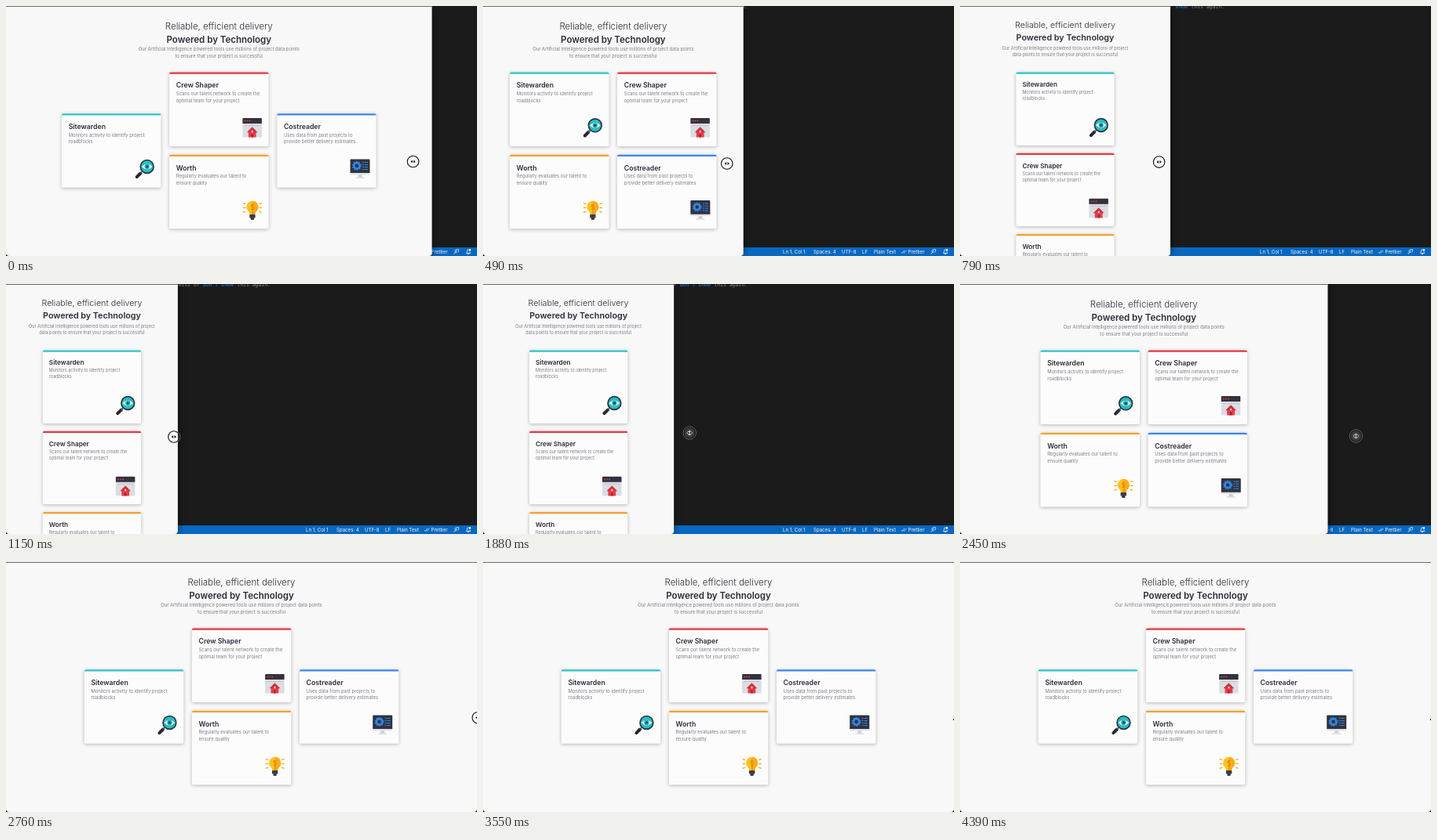
An HTML page with a canvas for the animation above (4420 ms loop, 600 by 319 pixels).

```html
<!DOCTYPE html>
<html lang="en">
<head>
<meta charset="utf-8">
<title>Responsive cards</title>
<style>
html, body { margin: 0; width: 100%; height: 100%; overflow: hidden; background: #1b1b1b; }
canvas { display: block; }
</style>
</head>
<body>
<canvas id="stage" width="600" height="319"></canvas>
<script>
const c = document.getElementById('stage').getContext('2d');
const LOOP = 4420;
const SANS = 'Inter, "Open Sans", sans-serif';
const DARK = '#2c2c3b', GREY = '#7c7e87';

// time, window width, pointer x, pointer y
const KEYS = [
  [0, 543, 519, 198.5], [490, 332, 311, 201], [1150, 219, 214, 195],
  [1420, 206, 207, 193], [1880, 243, 263, 190], [2210, 337, 366, 192],
  [2450, 468, 504, 194], [2750, 600, 599.5, 198.5], [3000, 600, 601.5, 201],
  [LOOP, 600, 601.5, 201]
];

const CARDS = {
  watch: { title: 'Sitewarden', color: '#2fc4c6', icon: magnifier,
    text: ['Monitors activity to identify project', 'roadblocks'] },
  team: { title: 'Crew Shaper', color: '#e5383f', icon: house,
    text: ['Scans our talent network to create the', 'optimal team for your project'] },
  merit: { title: 'Worth', color: '#f5a02f', icon: bulb,
    text: ['Regularly evaluates our talent to', 'ensure quality'] },
  cost: { title: 'Costreader', color: '#3d87ea', icon: monitor,
    text: ['Uses data from past projects to', 'provide better delivery estimates'] }
};

// Card places: offset from the page centre, top
const WIDE = {
  big: 11.5, title: 8.7, small: 5.92, line: 8.3, w: 126.5, h: 94.5, pad: 8.7,
  head: [30, 47, 57.2, 65.6], titleY: 19.8, textY: 29.6, icon: [93.3, 58.3],
  intro: ['Our Artificial Intelligence powered tools use millions of project data points',
    'to ensure that your project is successful']
};
const THREE = { ...WIDE, at: { watch: [-200.3, 137.2], team: [-63.2, 84.6], merit: [-63.2, 189.8], cost: [73.9, 137.2] } };
const TWO = { ...WIDE, at: { watch: [-131.8, 84.6], team: [5.2, 84.6], merit: [-131.8, 189.8], cost: [5.2, 189.8] } };
const ONE = {
  big: 10.75, title: 8.2, small: 5.5, line: 8, w: 125.3, h: 93.3, pad: 8,
  head: [28, 44, 56.2, 64.2], titleY: 18.8, textY: 27.8, icon: [93, 58],
  intro: ['Our Artificial Intelligence powered tools use millions of project',
    'data points to ensure that your project is successful'],
  at: { watch: [-62.6, 84.6], team: [-62.6, 187.8], merit: [-62.6, 291], cost: [-62.6, 394.2] }
};

function sample(t, col) {
  const slope = i => {
    const a = KEYS[Math.max(i - 1, 0)], b = KEYS[i], d = KEYS[Math.min(i + 1, KEYS.length - 1)];
    const turning = a !== b && b !== d && (b[col] - a[col]) * (d[col] - b[col]) <= 0;
    return turning ? 0 : (d[col] - a[col]) / (d[0] - a[0]);
  };
  let i = 0;
  while (i < KEYS.length - 2 && t >= KEYS[i + 1][0]) i++;
  const p = KEYS[i], q = KEYS[i + 1], span = q[0] - p[0], u = (t - p[0]) / span, v = 1 - u;
  return p[col] * v * v * (1 + 2 * u) + q[col] * u * u * (3 - 2 * u)
    + span * u * v * (slope(i) * v - slope(i + 1) * u);
}

function rect(color, x, y, w, h, radius = 0) {
  c.fillStyle = color;
  c.beginPath();
  c.roundRect(x, y, w, h, radius);
  c.fill();
}

function disc(color, x, y, r, from = 0, to = Math.PI * 2) {
  c.fillStyle = color;
  c.beginPath();
  c.arc(x, y, r, from, to);
  c.fill();
}

function poly(color, ...pts) {
  c.fillStyle = color;
  c.beginPath();
  for (let i = 0; i < pts.length; i += 2) c.lineTo(pts[i], pts[i + 1]);
  c.closePath();
  c.fill();
}

function line(color, width, ...pts) {
  c.strokeStyle = color;
  c.lineWidth = width;
  c.beginPath();
  for (let i = 0; i < pts.length; i += 2) c.lineTo(pts[i], pts[i + 1]);
  c.stroke();
}

function ring(color, width, x, y, r) {
  c.strokeStyle = color;
  c.lineWidth = width;
  c.beginPath();
  c.arc(x, y, r, 0, Math.PI * 2);
  c.stroke();
}

function text(str, x, y, font, color, align = 'left') {
  c.font = font;
  c.fillStyle = color;
  c.textAlign = align;
  c.fillText(str, x, y);
}

function shadow(color, blur, y = 0) {
  c.shadowColor = color;
  c.shadowBlur = blur;
  c.shadowOffsetY = y;
}

// Icons fill a box of about 25 by 25
function magnifier() {
  c.lineCap = 'round';
  line('#26262f', 4, 2.4, 22.6, 7, 18);
  c.lineCap = 'butt';
  line('#55606b', 1.6, 7, 18, 10, 15);
  disc('#2b2d38', 15.4, 9.4, 9.2);
  disc('#27bcc2', 15.4, 9.4, 7.6);
  c.fillStyle = '#e9f8f8';
  c.beginPath();
  c.moveTo(8.6, 9.4);
  c.quadraticCurveTo(15.4, 2.4, 22.2, 9.4);
  c.quadraticCurveTo(15.4, 16.4, 8.6, 9.4);
  c.fill();
  disc('#1fa5b0', 15.4, 9.4, 3.1);
  disc('#22424e', 15.4, 9.4, 1.4);
}

function house() {
  rect('#dcdde2', 0, 6, 24.5, 18.5, 1);
  rect('#31323e', 0, 0, 24.5, 7, [1, 1, 0, 0]);
  for (const x of [3.2, 6.2, 9.2]) disc('#d8404a', x, 3.6, 0.9);
  line('#b9bbc3', 0.7, 2, 9.6, 22.5, 9.6);
  rect('#e2404b', 7.4, 17, 9.8, 7.6);
  poly('#d22f3d', 12.3, 11.4, 19.2, 18.4, 5.4, 18.4);
  rect('#f4c9cc', 11.2, 16, 2.2, 2.4);
  rect('#a82736', 11, 20.4, 2.6, 4.2);
}

function bulb() {
  for (const y of [4.5, 9.3, 14.1]) {
    const tilt = (y - 9.3) / 4;
    line('#f7a81c', 1.3, 0.5, y + tilt, 4, y);
    line('#f7a81c', 1.3, 24.5, y + tilt, 21, y);
  }
  poly('#ffc21c', 7.5, 12, 12.5, 12, 12.5, 18, 9, 18);
  poly('#f3a011', 12.5, 12, 17.5, 12, 16, 18, 12.5, 18);
  disc('#ffc21c', 12.5, 8.3, 7.6);
  disc('#f9ac14', 12.5, 8.3, 7.6, -Math.PI / 2, Math.PI / 2);
  line('#e58110', 1, 14.6, 6, 11.2, 5.6, 10.8, 8, 14.2, 9, 13.8, 11.6, 10.4, 11.2);
  line('#e58110', 0.9, 12.5, 4, 12.5, 18);
  rect('#3a3c47', 8.8, 17.8, 7.4, 4.6, 0.8);
  rect('#25262e', 10.4, 22.2, 4.2, 2.4, 0.8);
}

function monitor() {
  rect('#e2e3e8', 0, 16, 25, 4, [0, 0, 1, 1]);
  rect('#31323e', 0, 0, 25, 17.6, [1, 1, 0, 0]);
  rect('#c9ccd4', 10, 20, 5, 3);
  rect('#dcdee4', 7, 22.8, 11, 1.8, 0.5);
  ring('#2f86e6', 2.8, 8.4, 8.4, 3.7);
  c.setLineDash([1.6, 1.87]);
  ring('#2f86e6', 1.2, 8.4, 8.4, 5.5);
  c.setLineDash([]);
  for (const y of [4, 7, 10, 13]) {
    line('#2f86e6', 1.1, 15.5, y, 17.5, y);
    line('#2f86e6', 1.1, 18.3, y, 22.5, y);
  }
}

function editor() {
  rect('#1b1b1b', 0, 0, 600, 319);
  const mono = 'italic 6.45px "DejaVu Sans Mono", monospace';
  text('dismiss or', 208, 3.4, mono, '#8a8a8a');
  text("don't show", 251, 3.4, mono, '#2f86d8');
  text('this again.', 294.6, 3.4, mono, '#8a8a8a');

  rect('#0868c0', 0, 308, 600, 11);
  const items = [['Ln 1, Col 1', 382], ['Spaces: 4', 421], ['UTF-8', 457],
    ['LF', 483], ['Plain Text', 498], ['Prettier', 541.5]];
  for (const [str, x] of items) text(str, x, 315.8, '6.1px ' + SANS, '#f4f8fc');
  line('#f4f8fc', 0.7, 533, 314, 534.3, 315.4, 537, 311.8);
  line('#f4f8fc', 0.7, 535.8, 314.8, 536.4, 315.4, 539.2, 311.8);
  ring('#f4f8fc', 0.7, 573, 312.6, 1.2);
  line('#f4f8fc', 0.7, 571, 316.6, 571.4, 315, 573, 314.4, 574.2, 315);
  line('#f4f8fc', 0.7, 573.6, 310.6, 576.6, 310.6, 576.6, 313.4, 575.2, 314.2);
  line('#f4f8fc', 0.8, 586.4, 315.4, 587.4, 313.6, 587.6, 311.4, 589, 310.6);
  line('#f4f8fc', 0.8, 586.4, 315.4, 591.8, 315.4, 590.9, 313.6);
  disc('#f4f8fc', 590.8, 311.4, 1.4);
  disc('#f4f8fc', 589, 316.4, 0.8);
}

function card({ title, color, icon, text: lines }, x, y, lay) {
  shadow('rgba(40,40,60,.32)', 4, 1);
  rect('#fcfcfc', x, y, lay.w, lay.h, 2);
  shadow('transparent', 0);
  rect(color, x, y, lay.w, 2.2, [2, 2, 0, 0]);
  text(title, x + lay.pad, y + lay.titleY, `600 ${lay.title}px ${SANS}`, DARK);
  lines.forEach((s, i) =>
    text(s, x + lay.pad, y + lay.textY + i * lay.line, `${lay.small}px ${SANS}`, GREY));
  c.save();
  c.translate(x + lay.icon[0], y + lay.icon[1]);
  icon();
  c.restore();
}

function page(w) {
  const lay = w < 300 ? ONE : w < 469 ? TWO : THREE;
  const mid = w / 2;
  rect('#000', 0, 308, 10, 11);
  if (w > 598) rect('#000', 590, 308, 10, 11);
  shadow('rgba(0,0,0,.6)', 10);
  rect('#f8f8f8', 0, 0, w, 319, [0, 0, 4, 4]);
  shadow('transparent', 0);
  rect('#6a6a6a', 0, 0, w, 0.9);

  const [a, b, d, e] = lay.head;
  text('Reliable, efficient delivery', mid, a, `300 ${lay.big}px ${SANS}`, DARK, 'center');
  text('Powered by Technology', mid, b, `600 ${lay.big}px ${SANS}`, DARK, 'center');
  text(lay.intro[0], mid, d, `${lay.small}px ${SANS}`, GREY, 'center');
  text(lay.intro[1], mid, e, `${lay.small}px ${SANS}`, GREY, 'center');
  for (const id in CARDS) card(CARDS[id], mid + lay.at[id][0], lay.at[id][1], lay);
}

function pointer(x, y, alpha) {
  c.save();
  c.translate(x, y);
  c.globalAlpha = alpha;
  disc('rgba(255,255,255,.14)', 0, 0, 8);
  ring('rgba(255,255,255,.4)', 1, 0, 0, 8.1);
  ring('#111', 1.1, 0, 0, 7.3);
  c.globalAlpha = 1;
  for (const s of [-1, 1]) {
    const arrow = [s * 3.2, 0, s * 0.7, -2, s * 0.7, 2, s * 3.2, 0];
    line('#fff', 1.3, ...arrow);
    poly('#111', ...arrow);
  }
  c.restore();
}

function draw() {
  const t = performance.now() % LOOP;
  editor();
  page(sample(t, 1));
  pointer(sample(t, 2), sample(t, 3), Math.min(1, Math.max(0, (2960 - t) / 150)));
  requestAnimationFrame(draw);
}
draw();
</script>
</body>
</html>
```
